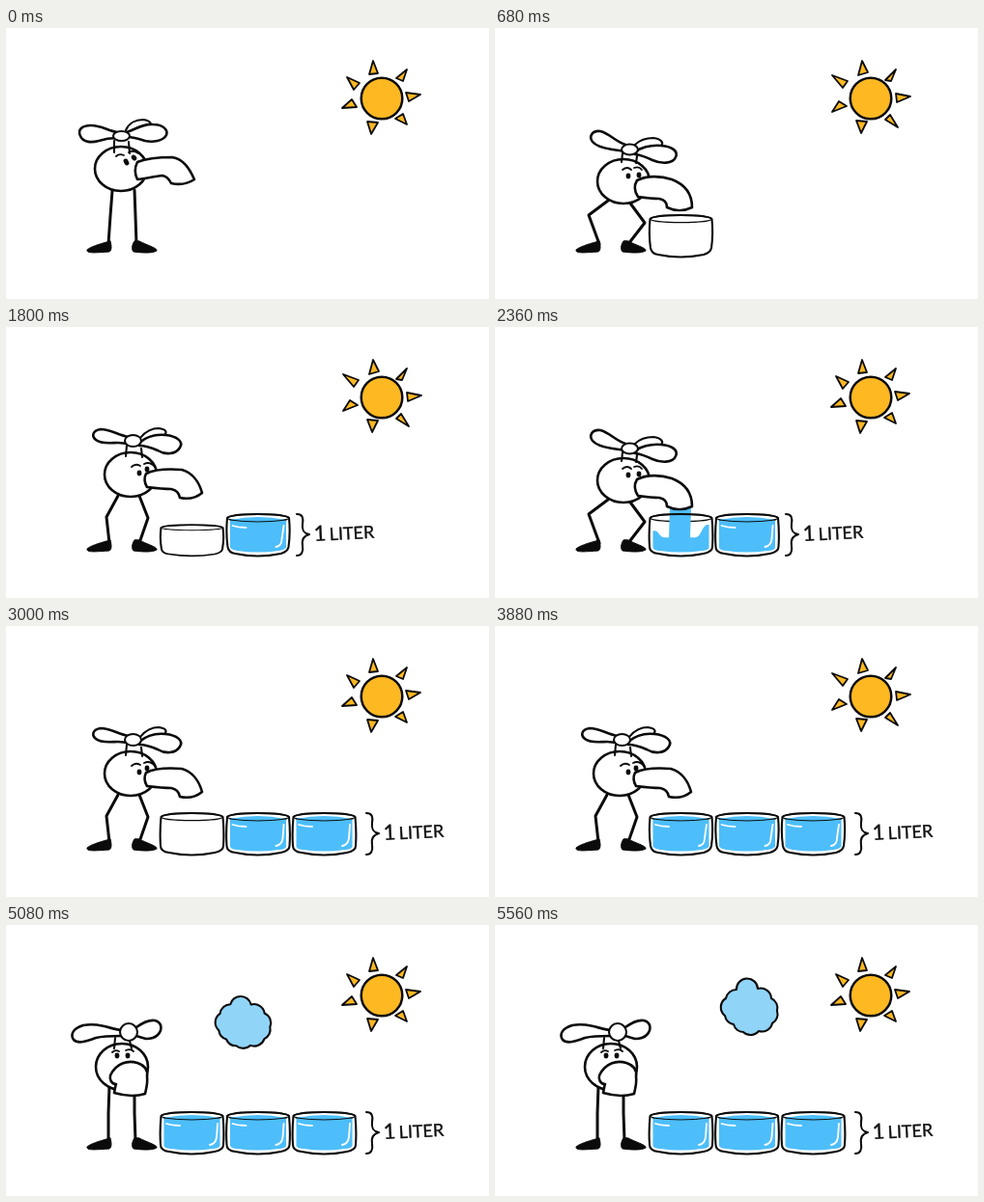
Animation of 500 by 281 pixels, one loop 5640 ms. Source, as an HTML page:

```html
<!DOCTYPE html>
<html lang="en">
<head>
<meta charset="utf-8">
<title>Three liters</title>
<style>
html, body { margin: 0; width: 100%; height: 100%; overflow: hidden; background: #fff; }
svg { display: block; width: 100vw; height: 100vh; fill: none; stroke: #0b0b0b; stroke-width: 2.1; stroke-linecap: round; stroke-linejoin: round; }
text { font-family: Lato, "Open Sans", sans-serif; fill: #111; stroke-width: .35; }
</style>
</head>
<body>
<svg id="stage" viewBox="0 0 500 281"></svg>
<script>
const LOOP = 5640, HOLD = 200, STEP = 80;
const WATER = '#4dbefa', STEAM = '#90d4f8', SUN = '#fdb822';

const POSES = {
  stand: {
    legs: 'M110 169L108 195L106 224M133 168L134 195L135 224',
    back: 'M124 106C127 99 134 95 142 95C150 96 152 100 147 104',
    stem: 'M112 117L112 129M127 118L128 130',
    head: 'M92 146A27 23 0 1 1 146 146A27 23 0 1 1 92 146Z',
    left: 'M115 108C105 106 98 101 88 101C78 101 74 106 77 112C80 119 89 119 96 117C102 115 109 114 115 114',
    right: 'M125 108C134 105 142 99 152 100C163 100 168 106 166 111C163 117 152 119 144 117C138 115 132 113 125 113',
    hub: 'M111 112A8.5 5 0 1 1 128 112A8.5 5 0 1 1 111 112Z',
    spout: 'M136 139C146 135 160 134 172 134C184 136 190 146 195 157C189 161 180 163 171 161C169 157 167 154 162 153C153 154 145 156 136 157C133 151 133 145 136 139Z',
    eyes: 'M124 138L125 140M132 134L133 135',
    brows: 'M114 133Q117 130 122 132M127 129Q132 126 137 130'
  },
  pour: {
    legs: 'M117 179L97 194L108 224M138 179L155 202L138 224',
    back: 'M145 121C150 116 157 114 164 114C172 115 175 119 172 122',
    stem: 'M132 130L131 139M147 133L146 140',
    head: 'M106 159A27 23 0 1 1 160 159A27 23 0 1 1 106 159Z',
    left: 'M135 121C125 118 118 109 109 107C100 106 97 113 101 118C106 124 116 125 122 126C127 127 131 127 135 128',
    right: 'M145 128C152 124 161 121 172 122C184 123 190 128 187 134C184 141 172 141 163 137C157 134 152 132 145 131',
    hub: 'M131 126A8.5 5.5 0 1 1 148 126A8.5 5.5 0 1 1 131 126Z',
    spout: 'M147 158C157 153 171 153 183 157C196 162 204 172 204 186C196 190 186 190 178 186C178 181 176 178 170 177C162 177 155 176 148 175C144 169 144 163 147 158Z',
    eyes: 'M138 153L138 154M149 152L149 153',
    brows: 'M132 147Q137 143 141 147M144 145Q149 143 152 147'
  },
  rest: {
    legs: 'M116 175L104 197L107 224M138 175L147 198L138 224',
    back: 'M139 115C144 108 152 105 158 105C166 106 167 109 164 112',
    stem: 'M125 123L124 134M140 126L141 135',
    head: 'M102 153A27 23 0 1 1 156 153A27 23 0 1 1 102 153Z',
    left: 'M127 114C116 112 108 106 98 106C90 107 88 113 93 117C99 122 110 120 116 120C120 120 123 121 127 121',
    right: 'M138 120C145 114 155 111 165 112C177 113 184 119 180 125C176 132 165 133 157 128C150 125 144 123 138 123',
    hub: 'M123 118A8.5 6 0 1 1 140 118A8.5 6 0 1 1 123 118Z',
    spout: 'M145 152C155 147 169 147 182 148C193 151 200 161 203 172C197 177 189 179 180 177C179 172 177 169 171 168C162 168 154 167 146 166C143 161 143 156 145 152Z',
    eyes: 'M138 151L138 152M146 147L146 148',
    brows: 'M130 145Q134 141 139 144M143 142Q149 139 154 145'
  },
  front: {
    legs: 'M107 167L106 195L106 224M133 174L133 195L134 224',
    back: 'M122 108C124 105 126 104 128 104C130 105 131 106 131 108',
    stem: 'M113 117L112 128M128 120L130 128',
    head: 'M93 147A27 24 0 1 1 147 147A27 24 0 1 1 93 147Z',
    left: 'M119 109C106 107 94 101 80 104C70 107 66 113 70 119C75 124 85 120 93 117C101 115 110 115 119 115',
    right: 'M135 106C142 101 148 98 154 99C162 101 162 109 157 114C153 118 149 118 145 118C141 117 138 116 135 115',
    hub: 'M118 111A9 9 0 1 1 136 111A9 9 0 1 1 118 111Z',
    spout: 'M108 156C114 143 126 140 136 143C145 146 147 151 146 157C147 164 145 170 144 175C134 178 122 177 112 174C113 170 113 167 114 165C109 165 107 160 108 156Z',
    eyes: 'M115 135L115 136M126 135L126 136',
    brows: 'M110 132Q113 129 117 131M124 130Q129 128 132 131'
  }
};

const MOVES = [
  [200, 600, 'pour'], [1400, 1560, 'rest'], [1960, 2120, 'pour'], [2640, 2800, 'rest'],
  [3040, 3160, 'pour'], [3680, 3800, 'rest'], [4040, 4240, 'front']
];
const CUPS = [[440, 800], [1720, 2120], [2840, 3120]];
const FILL = 560;

const FEET = 'M104 222C97 224 87 227 84 230C83 234 92 233 107 232C110 230 109 225 108 221Z' +
  'M133 221C130 225 130 230 132 232C140 233 151 234 156 231C157 228 145 225 138 221Z';

// Two drawings of the rays, swapped on every step
const RAYS = [
  'M380 34L385 47L376 48ZM415 43L411 55L404 52ZM429 69L414 67L417 76ZM415 100L403 94L411 89ZM378 110L374 97L385 98ZM348 83L358 74L363 82ZM353 51L366 57L360 64Z',
  'M380 34L386 46L376 49ZM415 43L410 55L404 54ZM430 71L415 68L416 77ZM417 103L404 95L409 90ZM379 109L374 96L385 97ZM349 87L356 76L364 81ZM349 49L365 55L360 62Z'
];

const puff = pts => {
  const [first, ...rest] = pts.split(',');
  return 'M' + first + [...rest, first].map(p => 'A11 11 0 0 1 ' + p).join('') + 'Z';
};
const CLOUD = [
  puff('182 142,184 126,194 115,214 118,228 125,233 142,225 153,210 157,198 156,187 152'),
  puff('238 94,239 76,250 67,272 66,286 76,292 89,287 102,273 110,257 111,247 103')
];
const TAIL = [
  'M190 151C189 164 186 178 172 186C158 190 146 187 139 179C147 190 160 193 172 190C188 184 193 172 196 165C198 161 201 159 206 157',
  'M190 151C190 153 191 154 191 155C192 156 192 157 193 157C194 158 195 158 196 158C198 158 200 158 202 157C203 157 205 157 206 157'
];

const ramp = (t, a, b) => Math.min(1, Math.max(0, (t - a) / (b - a)));
const ease = (t, a, b) => { const p = ramp(t, a, b); return p * p * (3 - 2 * p); };
const mix = (a, b, p) => {
  const to = b.match(/[\d.]+/g);
  let i = 0;
  return a.replace(/[\d.]+/g, n => +(+n + (to[i++] - n) * p).toFixed(2));
};
const path = (d, fill = 'none', extra = '') => `<path d="${d}" fill="${fill}" ${extra}/>`;
const group = (transform, body) => `<g transform="${transform}">${body}</g>`;

function sun(odd) {
  return `<circle cx="389" cy="73" r="21.3" fill="${SUN}" stroke-width="2.5"/>` +
    path(RAYS[odd], SUN, 'stroke-width="1.8"');
}

function tap(t) {
  let from = POSES.stand, to = from, p = 0;
  for (const [a, b, name] of MOVES) {
    if (t < a) break;
    from = to;
    to = POSES[name];
    p = ease(t, a, b);
  }
  const part = k => mix(from[k], to[k], p);
  const bold = 'stroke-width="2.6"';
  return path(part('legs'), 'none', 'stroke-width="3"') + path(FEET, '#0b0b0b', 'stroke-width="1"') +
    path(part('head'), '#fff', bold) + path(part('back'), '#fff') +
    path(part('stem'), '#fff') +
    ['left', 'right'].map(k => path(part(k), '#fff', bold)).join('') +
    path(part('hub'), '#fff') +
    path(part('eyes'), 'none', 'stroke-width="4.8"') +
    path(part('brows'), 'none', 'stroke-width="1.8"') +
    path(part('spout'), '#fff', bold);
}

function cup(t, x, born, start, odd) {
  if (t < born) return '';
  const p = ramp(t, start, start + FILL);
  const size = ease(t, born - STEP, born + 2 * STEP);
  const y = 232 - 32 * p, wave = 14 * Math.sin(Math.PI * p);
  const a = y - wave / 2, b = y - wave, n = odd * 2;
  const bare = 'stroke="none"';
  let s = '<ellipse cx="32.5" cy="198" rx="32" ry="3.6" fill="#fff" stroke-width="1.2"/>';
  if (p > 0) {
    s += path(`M3.5 229V${a}C10 ${a - 2} 9 ${y} 16 ${y}H46C55 ${y} 53 ${b} 61.5 ${b}V229` +
      `Q${60 - n} 232 54 232Q32 235 11 232Q${5 + n} 232 3.5 229Z`, WATER, bare);
  }
  if (p > 0 && p < 1) s += path(`M21 186H43L42 ${y + 1}H20Z`, WATER, bare);
  if (p === 1) {
    s += path('M4 200Q32 194 61 200Z', WATER, bare) +
      path('M3 200Q32 204 62 200', 'none', 'stroke-width="1"') +
      path(`M6 206Q12 208 20 208M59 206L${58 - n / 2} 220Q57 227 51 228`, 'none', 'stroke="#fff" stroke-width="1.8"');
  }
  s += path(`M.5 198Q-1 214 ${n / 2} 228Q${n} 234 9 235Q32 240 56 235Q${65 - n} 233 ${65 - n / 2} 228Q66 214 64.5 198Q60 194 32 194Q5 194 .5 198`);
  return group(`translate(${x} ${237 * (1 - size)}) scale(1 ${size})`, s);
}

function label(t, slide) {
  let s = '';
  if (t >= 1000) s += path('M229 194C235 194 236 198 235 204C234 211 236 214 242 215C236 217 234 220 235 227C236 233 234 237 229 237');
  if (t >= 1160) {
    s += '<text transform="rotate(-3 248 222)"><tspan x="247" y="222" font-size="22">1</tspan>' +
      '<tspan x="263" y="222" font-size="18">LITER</tspan></text>';
  }
  return group(`translate(${72 * slide} 0)`, s);
}

function steam(t) {
  if (t < 4320) return '';
  const grow = ease(t, 4240, 4680), rise = ease(t, 4680, 5320), fade = ramp(t, 4680, 4920);
  let s = path(mix(CLOUD[0], CLOUD[1], rise), STEAM);
  if (fade < 1) s += group(`translate(${58 * rise} ${-48 * rise})`, path(mix(TAIL[0], TAIL[1], fade), STEAM));
  return group(`translate(139 180) scale(${grow}) translate(-139 -180)`, s);
}

const stage = document.getElementById('stage');
let shown = -1;

function draw(t, odd) {
  const slide = ease(t, 1480, 1720) + ease(t, 2680, 2840);
  stage.innerHTML = sun(odd) +
    CUPS.map(([born, start], i) => cup(t, 160 + 68.5 * (slide - i), born, start, odd)).join('') +
    label(t, slide) + tap(t) + steam(t);
}

function tick(now) {
  const t = now % LOOP;
  const n = t < HOLD ? 0 : 1 + Math.floor((t - HOLD) / STEP);
  if (n !== shown) {
    shown = n;
    draw(n ? HOLD + (n - 1) * STEP : 0, n % 2);
  }
  requestAnimationFrame(tick);
}
tick(performance.now());
</script>
</body>
</html>
```
